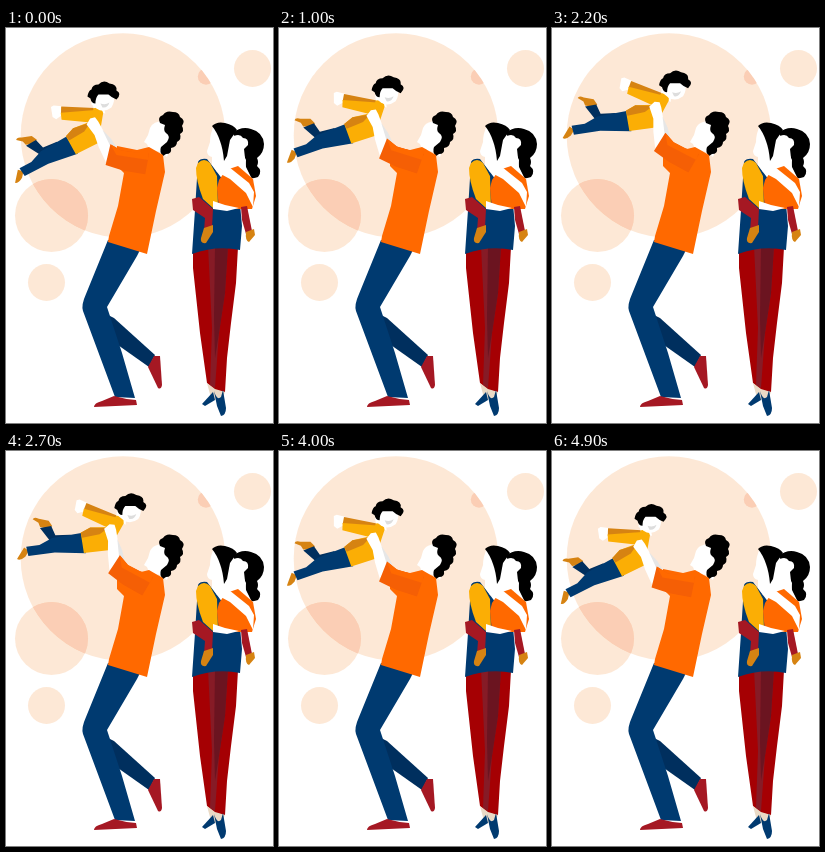
Recreate the animation shown at these times as an HTML page. Size 267x395 px, loop 5 s.

```html
<!DOCTYPE html>
<html lang="en">
<head>
<meta charset="utf-8">
<title>Family</title>
<style>
  html, body { margin: 0; width: 100%; height: 100%; overflow: hidden; background: #fff; }
  svg { display: block; width: 100%; height: 100%; }
  .peach { fill: rgb(245, 138, 50); fill-opacity: .2; }
  .pink { fill: #fbceb5; }
  .orange { fill: #ff6900; }
  .fold { fill: #f55f05; }
  .navy { fill: #003a70; }
  .deep { fill: #002f5e; }
  .red { fill: #a50003; }
  .wine { fill: #a51823; }
  .yellow { fill: #fbae05; }
  .brown { fill: #d68312; }
  .skin { fill: #fff; }
</style>
</head>
<body>
<svg viewBox="0 0 267 395">
  <g class="peach">
    <circle cx="117" cy="107.500" r="102.300"/>
    <circle cx="246.500" cy="40.500" r="18.500"/>
    <circle cx="45.500" cy="187.500" r="36.500"/>
    <circle cx="40.500" cy="254.500" r="18.500"/>
  </g>
  <clipPath id="big"><circle cx="117" cy="107.500" r="102.300"/></clipPath>
  <g class="pink" clip-path="url(#big)">
    <circle cx="200" cy="48.500" r="8.200"/>
    <circle cx="45.500" cy="187.500" r="36.500"/>
  </g>

  <!-- mother -->
  <path class="skin" d="M208 97Q204 106 204 114L201 123Q201 128 206 129L206 138L222 150L225 115Z"/>
  <path d="M206 98Q211 93 219 95Q228 97 231 102L224 112L221 128L218 133Q217 121 214 113Q211 104 206 98Z"/>
  <path class="red" d="M187 219L232 219L230 255L225 295L221 330L219 364L209 362L201 355L194 305L187 240Z"/>
  <path fill="#861b26" d="M202 218L222 218L219 265L213 305L209 360L204 357L206 300Z"/>
  <path fill="#6b1420" d="M209 218L222 218L219 265L213 305L209 330L208 290Z"/>
  <path class="navy" d="M192 134Q194 130 201 131L214 148L234 176L236 198L234 222Q210 217 186 226L189 182Z"/>
  <path fill="#eadac6" d="M201 355L209 361L219 364L215 374L205 370Z"/>
  <path class="navy" d="M207 364L209 372L199 378L196 376Z"/>
  <path class="navy" d="M208 363Q211 373 215 369L217 362L220 380Q220 387 215 388L211 378Z"/>
  <path class="yellow" d="M192 135Q198 129 204 135L211 148L212 179L207 180L197 171Q190 153 190 140Z"/>

  <!-- toddler -->
  <path d="M227 105Q235 98 245 101Q257 104 258 116Q258 125 251 130Q253 134 251 138Q257 143 252 149Q245 152 239 147L240 132Z"/>
  <path class="skin" d="M228 108Q234 105 237 110Q243 110 242 117L238 121L240 139L247 153L230 155L231 138Q224 137 223 128L223 118Z"/>
  <path class="orange" d="M213 152L220 142L232 138L247 151L250 168L246 181L213 181L211 160Z"/>
  <path class="skin" d="M207 138Q216 133 223 139L243 155L248 164L247 179L240 165L224 151L211 144Z"/>
  <path class="skin" d="M207 173L219 177L233 180L221 183L207 181Z"/>
  <path class="wine" d="M186 171L193 169L207 181L206 200L198 203L199 190L187 182Z"/>
  <path class="wine" d="M235 179L241 178L246 203L240 206L236 192Z"/>
  <path class="brown" d="M198 200L207 197L207 204L200 215Q194 216 195 210Z"/>
  <path class="brown" d="M240 204L248 201L249 207L243 214Q239 213 240 204Z"/>

  <!-- father -->
  <path class="deep" d="M96 284L108 290L149 327L143 339L102 310Z"/>
  <path class="navy" d="M102 212L135 220L131 228L101 279L116 325L129 370L109 369L77 283Q75 277 80 266Z"/>
  <path class="wine" d="M88 379Q88 375 96 373L108 368Q118 371 130 372L131 377Z"/>
  <path class="wine" d="M142 339L148 328L154 328L156 357Q155 362 152 360Z"/>
  <path class="skin" d="M158 93Q147 93 144 100L142 107L138 114L141 116L143 121L154 124L161 129L169 108Z"/>
  <path d="M154 95Q151 89 157 87Q160 82 167 84Q173 84 174 89Q180 92 176 98Q179 103 174 106Q176 111 171 114Q171 119 165 120Q166 126 160 126L157 128Q153 124 155 119L161 114Q165 108 160 105Q157 103 159 97Z"/>
  <path class="orange" d="M111 118L131 122L143 119L157 127L159 144L150 183L141 226L102 214L103 208L112 178L118 145L111 138Z"/>

  <!-- swings about the father's shoulder -->
  <g id="swing">
    <path class="brown" d="M21 79Q22 76 27 78L37 79L41 84L38 87L29 86L27 82Z"/>
    <path class="deep" d="M29 87L40 84L45 93L60 91L60 103L42 101Z"/>
    <path class="brown" d="M10 118L15 108L20 111L17 117Q12 122 9 120Z"/>
    <path class="navy" d="M17 107L30 104L42 96L72 88L77 108L46 110L20 116Z"/>
    <path class="skin" d="M63 56L66 55L74 58L73 66L65 69L62 66Z"/>
    <path class="brown" d="M73 58L105 68L100 76L71 65Z"/>
    <path class="skin" d="M104 62L114 62L114 76L104 72Z"/>
    <path class="yellow" d="M70 88L79 82L97 80L104 68Q112 67 112 75L107 86L99 103L75 108Z"/>
    <path class="brown" d="M70 88L79 82L97 81L89 88L72 93Z"/>
    <path class="yellow" d="M71 64L105 70Q112 72 109 80L100 82L70 71Z"/>
    <g id="head">
      <path class="skin" d="M106 55L127 55Q129 64 125 70Q117 76 110 71L105 67Z"/>
      <path fill="#ddd" d="M114 66Q119 68 123 65Q121 71 116 70Z"/>
      <path d="M101 59Q102 53 105 52Q106 47 112 47Q117 42 123 46Q131 47 130 53Q136 56 130 62Q125 60 122 57L112 57Q109 60 109 66Q105 66 104 61Z"/>
    </g>
    <path class="skin" d="M93 82L98 77L103 77L105 82L108 94L114 109L102 123L99 107L98 94Z"/>
    <path fill="#e6e6e6" d="M107 91L113 102L116 111L111 112Z"/>
    <path class="fold" d="M111 107L120 116L132 121L146 126L137 145L117 136L101 126Z"/>
    <path class="orange" d="M111 107L120 116L132 121L146 124L144 132L114 119Z"/>
  </g>
</svg>
<script>
  const swing = document.getElementById('swing');
  const head = document.getElementById('head');
  const turn = (el, deg, x, y) => el.setAttribute('transform', `rotate(${deg} ${x} ${y})`);

  function draw() {
    const t = Math.floor(performance.now() % 5000 / 100) * 100;
    const lift = 1 - Math.abs(t / 2500 - 1);
    const angle = 21.7 * lift - 14.8;
    turn(swing, angle, 143, 137);
    turn(head, -angle, 116.6, 57); // the head stays upright
    requestAnimationFrame(draw);
  }
  draw();
</script>
</body>
</html>
```
